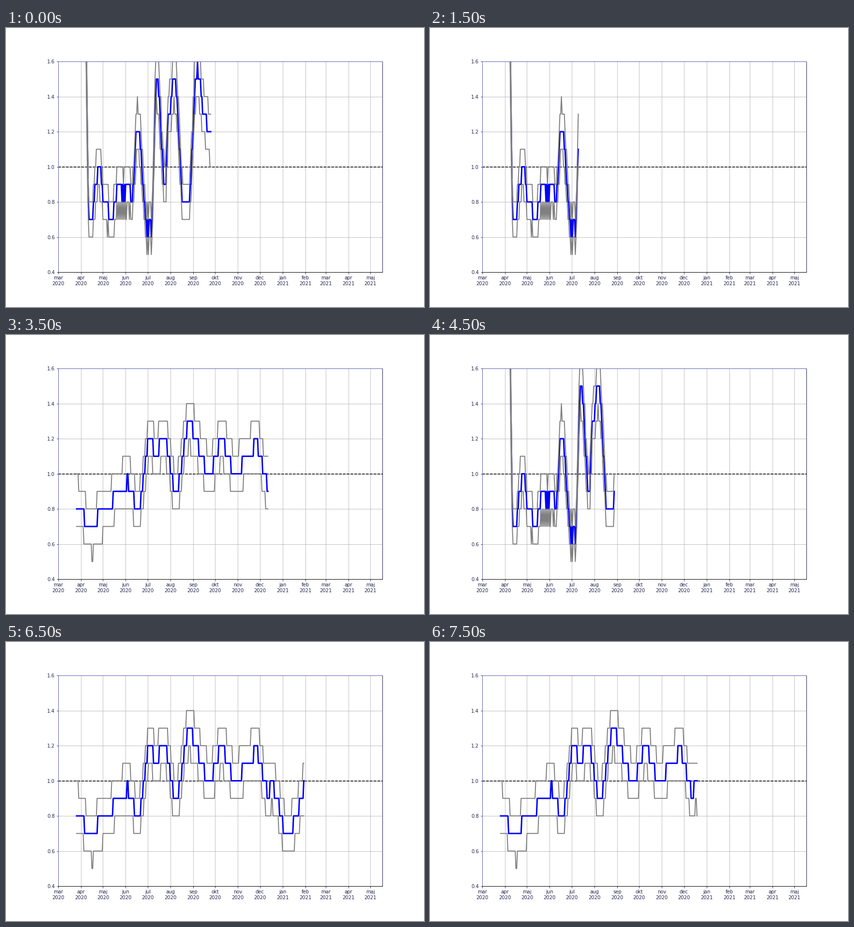
Write a matplotlib script that moves like this. It is 864 by 576 pixels and loops after 8 s.

```python
import numpy as np
import matplotlib.pyplot as plt
from matplotlib.animation import FuncAnimation

plt.rcParams["font.family"] = "DejaVu Sans"
plt.rcParams["font.size"] = 10

MONTHS = "mar apr maj jun jul aug sep okt nov dec jan feb mar apr maj".split()
INK = "#22224e"
EDGE = "#5c5cb4"

# Last day of data in each report, in days after 1 March 2020.
ENDS = [208, 398, 258, 131, 314, 229, 237, 286,
        426, 180, 244, 370, 349, 335, 160, 293]

# Turning points (day, value) of the estimate; it eases from one to the next.
EARLY = [(36, 2.1), (42, .7), (44, .66), (55.5, 1), (62, .81), (73, .7),
         (82, .87), (90, .85), (96, .88), (100.5, .81), (108, 1.23),
         (122.5, .645), (125, .67), (126.5, .635), (134.5, 1.5), (145.7, .9),
         (151, 1.32), (158.5, 1.49), (171.5, .8), (177, .79), (190, 1.56),
         (199, 1.3), (212, 1.1)]
LATE = [(25, .84), (46.5, .665), (55, .757), (95, .9505), (108.5, .81),
        (126, 1.2), (133, 1.115), (144, 1.2), (161, .908), (178, 1.27),
        (207, 1.015), (223, 1.175), (241, 1.02), (271, 1.157), (286.5, .94),
        (291, .97), (312.5, .71), (351, 1.1), (400, 1.04), (430, .9)]


def ease(points, days):
    """Half-cosine interpolation between the points."""
    x, y = np.array(points).T
    i = np.clip(np.searchsorted(x, days) - 1, 0, len(x) - 2)
    u = (days - x[i]) / (x[i + 1] - x[i])
    return y[i] + (y[i + 1] - y[i]) * (1 - np.cos(np.pi * u)) / 2


def report(end):
    """Days, estimate and its lower and upper bound, rounded to tenths."""
    if end < 215:
        days = np.arange(38, end + 1)
        mid = ease(EARLY, days) + 0.012 * np.cos(np.pi * days)
        band = 0.06 + 0.06 * mid
    else:
        days = np.arange(25, end + 1)
        mid = ease(LATE, days)
        band = 0.15 if end < 250 else 0.117
    return days, [np.round(v, 1) for v in (mid, mid - band, mid + band)]


fig = plt.figure(figsize=(12, 8), dpi=72, facecolor="white")
ax = fig.add_axes([0.125, 0.125, 0.775, 0.755])
ax.set_xlim(0, 442)
ax.set_ylim(0.4, 1.6)

first = np.datetime64("2020-03")
starts = np.arange(first, first + len(MONTHS)).astype("datetime64[D]")
ax.set_xticks((starts - starts[0]).astype(int))
ax.set_xticklabels([f"{m}\n{str(s)[:4]}" for m, s in zip(MONTHS, starts)])
levels = np.arange(4, 17, 2) / 10
ax.set_yticks(levels)
ax.set_yticklabels([f"{v:.1f}" for v in levels])
ax.tick_params(labelcolor=INK)
ax.grid(True, color="#b0b0b0", linewidth=0.8)
for side, color in zip(("left", "top", "right", "bottom"),
                       (EDGE, EDGE, INK, "black")):
    ax.spines[side].set(color=color, linewidth=1)

ax.axhline(1, color="black", linestyle="--", linewidth=1.5)
lines = [ax.plot([], [], color=color, linewidth=width)[0]
         for color, width in (("blue", 3), ("gray", 2), ("gray", 2))]


def update(i):
    days, curves = report(ENDS[i])
    for line, values in zip(lines, curves):
        line.set_data(days, values)
    return lines


anim = FuncAnimation(fig, update, frames=len(ENDS), interval=500,
                     repeat=True, repeat_delay=0, blit=False)
plt.show()
```
